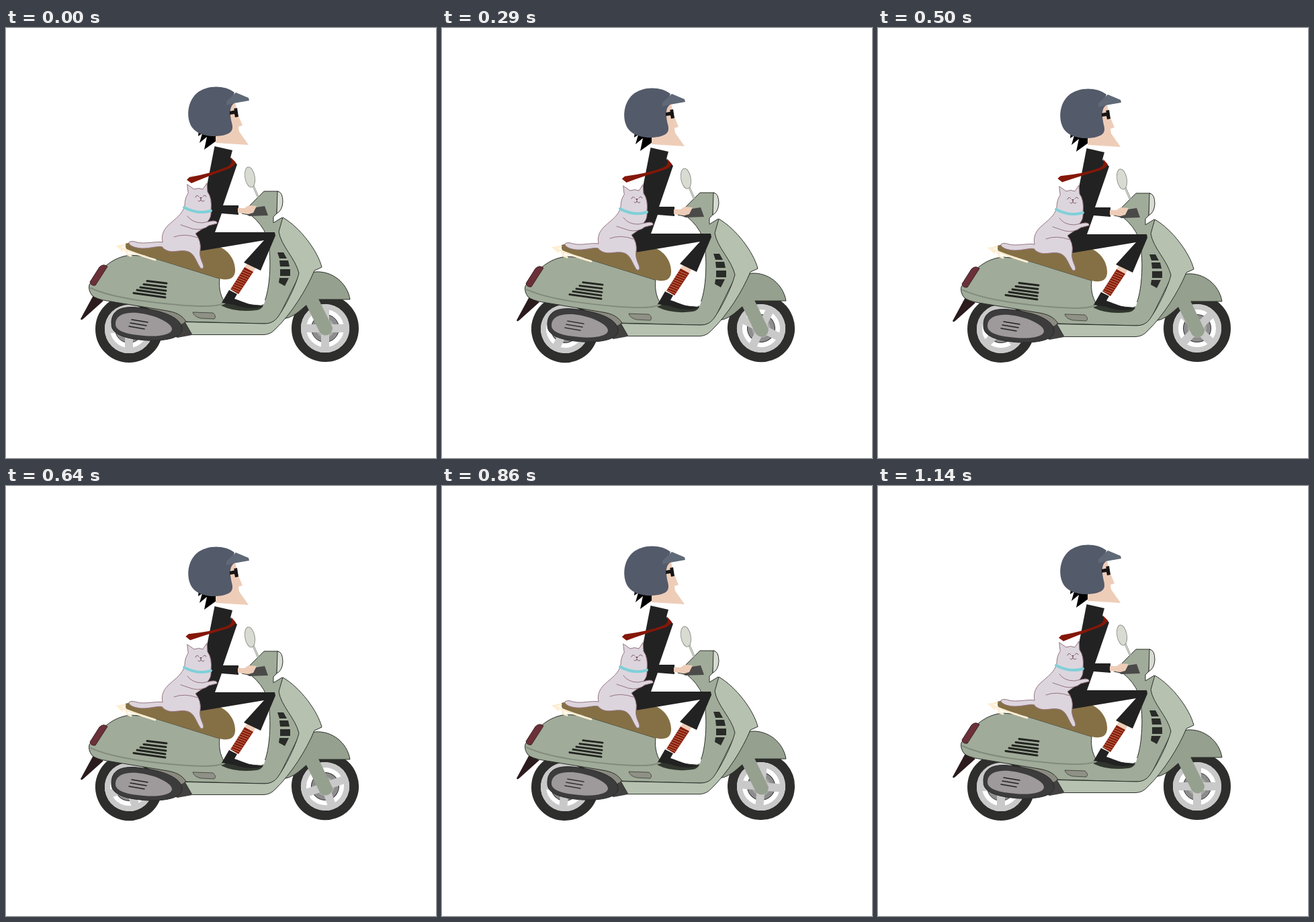
Recreate the animation shown at these times as an HTML page. Size 640x640 px, loop 1210 ms.

```html
<!DOCTYPE html>
<html lang="en">
<head>
<meta charset="utf-8">
<title>Scooter ride</title>
<style>
  html, body { margin: 0; width: 100%; height: 100%; overflow: hidden; background: #fff; }
  svg { display: block; width: 100vw; height: 100vh; }
  .line { stroke: #2b302a; stroke-width: 1; stroke-linejoin: round; }
  .cat { fill: #ddd5dd; stroke: #957480; stroke-width: 1; stroke-linejoin: round; stroke-linecap: round; }
  .stroke { fill: none; stroke-linecap: round; }
</style>
</head>
<body>
<svg viewBox="0 0 640 640">
  <defs>
    <g id="wheel">
      <circle r="43" fill="none" stroke="#2e2e2d" stroke-width="14"/>
      <circle r="32" fill="#fff" stroke="#c9c9c9" stroke-width="8"/>
      <circle r="20.5" fill="#8d8d8d" stroke="#343434"/>
      <circle r="14" fill="#a7a7a7"/>
      <path d="M-31 0H31M0-31V31" stroke="#c9c9c9" stroke-width="12"/>
      <circle r="11" fill="#c9c9c9"/>
    </g>
  </defs>

  <g transform="translate(183 448)"><use class="spin" href="#wheel"/></g>
  <g transform="translate(475 447)"><use class="spin" href="#wheel"/></g>

  <g id="ride">
    <!-- Scooter -->
    <path fill="#2b1b1d" d="M130 398L111 433Q112 436 116 432L145 406Z"/>
    <path fill="#8b8a80" class="line" d="M205 414L257 422Q270 430 270 440L260 452L230 428Z"/>
    <path fill="#424140" d="M240 452L268 437L277 457L255 461Z"/>

    <path fill="#95a08e" class="line" d="M413 433C430 400 440 369 460 363C485 361 508 379 512 404H466C445 406 438 429 413 433Z"/>
    <path fill="#95a08e" d="M443 404L467 453A10.5 10.5 0 0 0 486 446L465 403Z"/>

    <path fill="#a0ab99" class="line" d="M351 276L384 243H405L403 276L398 281V290L411 282L440 340L437 367L405 432Q398 440 385 440L268 437C262 427 252 423 240 421L150 406Q133 403 128 398Q122 390 124 382C143 355 160 341 185 338L212 340L318 373C316 387 320 403 328 411C342 421 374 421 383 411C394 390 396 334 388 309Q380 291 365 279Z"/>
    <path class="stroke" stroke="#828c7c" stroke-width="2" d="M126 387Q150 398 195 405Q260 414 295 414Q316 414 322 410"/>
    <path fill="#b6c1b0" class="line" d="M412 282C438 297 464 332 470 356L459 361C447 390 425 425 401 448Q394 456 384 456.5H277L266 437.5L385 440Q397 440 404 431C415 416 431 385 436 365C431 343 409 324 406 303Z"/>
    <path fill="#292b28" d="M404 334H413L418 343H407ZM407 346H420L422 355H408ZM408 359H423V369H408ZM407 372H421L415 384L406 379Z"/>
    <path fill="#d7dbd2" class="line" d="M404 243Q412 244 412 259Q411 272 403 276Z"/>
    <path class="stroke" stroke="#8f938b" stroke-width="3" d="M368 235L375 251"/>
    <path class="stroke" stroke="#d7dbd2" stroke-width="1.5" d="M368 235L375 251"/>
    <ellipse cx="363" cy="222" rx="7.3" ry="15.2" transform="rotate(-10 363 222)" fill="#d7dbd2" stroke="#92968e"/>

    <path fill="#6b3038" stroke="#3b2426" d="M125 378L139 356Q145 350 151 355L133 383Q126 384 125 378Z"/>
    <path class="stroke" stroke="#232421" stroke-width="3" d="M210 377L239 380.5M205 382L238 386M200 386.5L238 391.5M195 390.5L237 396.5M190 395L237 401.5" transform="translate(0 -.5)"/>
    <path fill="#8f9186" class="line" stroke-opacity=".7" d="M278 423L308 424Q314 429 310 433L290 432Q280 430 278 423Z"/>

    <path fill="#3c3c3c" stroke="#282828" d="M157 441C156 419 173 414 195 416C235 420 262 432 262 448C262 462 235 466 210 465C180 463 157 457 157 441Z"/>
    <path fill="#9e999a" d="M163 441C163 427 177 423 195 424C225 427 247 440 247 448C247 457 225 460 205 458C180 456 163 451 163 441Z"/>
    <path class="stroke" stroke="#222" stroke-width="1.5" d="M187 434L211 438M185 439L209 443M183 444L206 448"/>

    <path fill="#857045" d="M178 325Q176 320 182 320C230 320 290 324 318 326C335 333 342 350 341 362C340 374 330 376 318 373L212 340C191 335 178 333 178 325Z"/>
    <path class="stroke" stroke="#fdeed2" stroke-width="3" d="M177 323L167 325Q185 334 222 345M167 325L173 331M179 332L181 337L186 339"/>

    <!-- Rider -->
    <path fill="#30362d" d="M320 413L332 408L383 413Q380 419 373 420Q342 424 320 413Z"/>
    <path fill="#fff" d="M346 398L343 404C356 409 370 414 384 411L386 405Z"/>
    <path fill="#eecdb8" d="M359 350L372 356L367 365L354 358Z"/>
    <path fill="#891b0b" d="M355 356L368 363L346 396L334 389Z"/>
    <g id="stripes" stroke="#c98f68" stroke-width=".9"></g>
    <path fill="#222" d="M332 390L344 396L340 403C355 408 368 415 383 414C371 419 351 417 340 412L321 409Z"/>
    <path fill="#222" d="M310.5 176L337 182L334 193L344 203L323 264L346 264V278L321 276L311 304H400L401 309L379 361L354 349L384 316L288 332L279 308L298 240Z"/>
    <path fill="#4a4a49" d="M359 278L372 267L385 265L390 279L362 280Z"/>
    <path fill="#eecdb8" d="M345 268H355L361 264L373 265L368 275L361 277L345 275Z"/>
    <path id="tie" fill="#841708" d="M334 192L342 200Q340 206 330 210Q305 219 276 231L269 226L273 222Q308 216 330 206Q339 201 334 192Z"/>
    <path d="M287 152L286 161L292 157L288 171L299 162L295 181L313 168V156Z"/>
    <path fill="#eecdb8" d="M312 158L332 155L334 114L341 111L345 128L352 145L346 147L347 154L361 174L312 171Z"/>
    <path fill="#535a6a" d="M340 96C325 84 298 85 284 97C269 110 268 135 277 148C286 160 305 163 322 160C336 157 339 152 336 141C333 128 332 116 341 111L336 106Z"/>
    <path fill="#5f6977" d="M328 109L342 96L361 104L362 108L339 112L328 115Z"/>
    <path fill="#171515" d="M333 124L340 122.5L339 120L344 119L346 132L341 133L340 128L333 129Z"/>

    <!-- Cat -->
    <path class="cat" d="M270 233L280 240Q287 237 293 240L299 231L300 244Q307 253 305 272Q306 282 300 288L292 299L282 306Q291 317 289 331Q287 338 293 351Q296 359 290 358C282 347 281 334 268 332C255 330 246 337 234 328C233 322 218 328 204 328C191 328 182 323 183 319Q187 316 195 319C207 322 223 317 233 319C231 309 234 301 241 294C254 282 263 277 266 264C266 257 268 250 271 246Z"/>
    <path class="cat" d="M270 280Q277 290 292 290L308 287Q315 287 314 291L302 294Q292 302 278 299L260 293"/>
    <path class="cat" style="fill:none" d="M250 311Q266 305 285 312"/>
    <path class="stroke" stroke="#7fd0d8" stroke-width="4" stroke-linecap="butt" d="M265 267Q286 278 305 272"/>
    <path class="stroke" stroke="#7b5965" d="M282 252Q284 247 287 251M293 251Q296 247 298 251M286 257Q289 260 290 255Q292 260 295 257"/>
    <path fill="#754e5a" d="M288 252H292L290 255Z"/>
  </g>
</svg>
<script>
  const LOOP = 1210, STEPS = 17, BOUNCE = 3, TIE_SWING = 4;
  // Wheel angle in degrees at chosen steps.
  const SPIN = [[0, 0], [8, 51], [10, 90], [12, 95], [16, 180]];

  const ride = document.getElementById('ride');
  const tie = document.getElementById('tie');
  const wheels = document.querySelectorAll('.spin');

  document.getElementById('stripes').innerHTML = Array.from({ length: 10 }, (_, i) => {
    const x = 353 - i * 2, y = 360 + i * 3.1;
    return `<path d="M${x} ${y}l12.5 5"/>`;
  }).join('');

  function wheelAngle(step) {
    const next = Math.max(1, SPIN.findIndex(([at]) => at >= step));
    const [fromStep, from] = SPIN[next - 1];
    const [toStep, to] = SPIN[next];
    return from + (to - from) * (step - fromStep) / (toStep - fromStep);
  }

  function render(time) {
    const step = Math.min(STEPS - 1, Math.floor((time % LOOP + 5) / (LOOP / STEPS)));
    const sink = Math.sin(Math.PI * step / (STEPS - 1));
    ride.setAttribute('transform', `translate(0 ${BOUNCE * sink})`);
    tie.setAttribute('transform', `rotate(${TIE_SWING * sink} 341 200)`);
    wheels.forEach(wheel => wheel.setAttribute('transform', `rotate(${wheelAngle(step)})`));
  }

  const start = performance.now();
  function tick() {
    render(performance.now() - start);
    requestAnimationFrame(tick);
  }
  tick();
</script>
</body>
</html>
```
